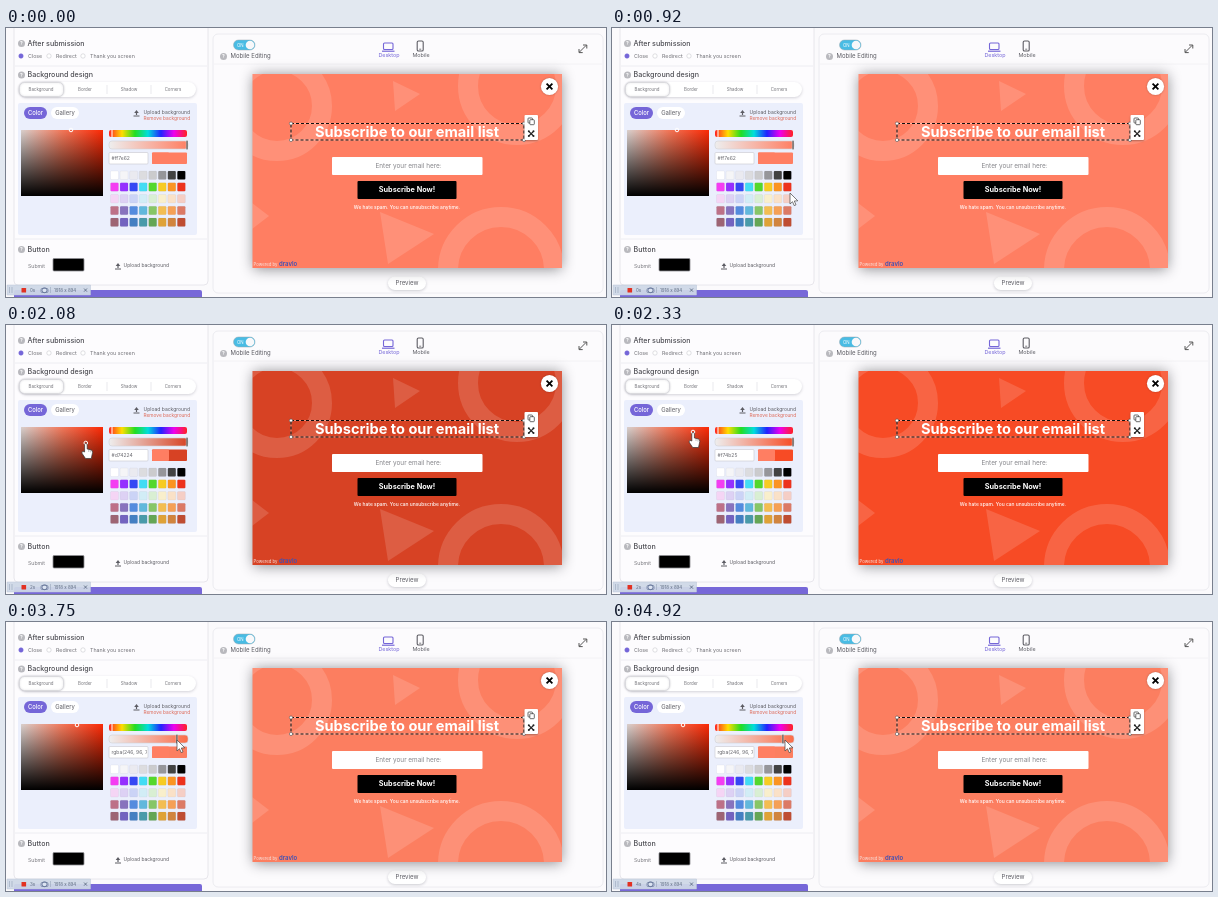
Recreate the animation shown at these times as an HTML page with a canvas. Size 600x269 px, loop 5080 ms.

```html
<!DOCTYPE html>
<html lang="en">
<head>
<meta charset="utf-8">
<title>Popup background editor</title>
<style>
  html, body { margin: 0; width: 100%; height: 100%; overflow: hidden; background: #fbfafc; }
  canvas { display: block; width: 600px; height: 269px; }
</style>
</head>
<body>
<canvas id="stage"></canvas>
<script>
const W = 600, H = 269, LOOP = 5080;
const canvas = document.getElementById('stage');
const ctx = canvas.getContext('2d');
const ratio = window.devicePixelRatio || 1;
canvas.width = W * ratio;
canvas.height = H * ratio;

const INK = '#5c5c63', PURPLE = '#7566d8', BASE = [255, 126, 98];
const TRANSLUCENT_LABEL = 'rgba(246, 96, 70, 0.87)';

// Each key: time, then values that are eased to the next key.
const COLOR_KEYS = [
  [0, ...BASE], [1330, ...BASE], [1580, 182, 68, 44], [1670, 168, 60, 37],
  [1830, 170, 58, 35], [2080, 215, 66, 36], [2330, 247, 75, 37],
  [2580, 250, 77, 41], [3000, 255, 108, 74], [3250, 251, 107, 72]
];
const MARKER_KEYS = [
  [0, 65, 102], [1330, 65, 102], [1580, 76, 121], [1670, 77, 125],
  [1920, 79, 125], [2330, 81, 107], [2580, 80, 106], [3000, 71, 103]
];
const CURSOR_KEYS = [
  [670, 206, 188], [920, 178, 165], [1000, 165, 152], [1330, 68, 104],
  [1580, 76, 121], [1670, 77, 125], [1920, 79, 125], [2330, 81, 107],
  [2580, 80, 106], [3000, 71, 103], [3080, 74, 104], [3250, 120, 112],
  [3420, 180, 117], [3670, 171, 118], [4000, 171, 118], [4420, 173, 118]
];
const ALPHA_KEYS = [[0, 1], [3420, 1], [3670, .87]];

function sample(keys, t) {
  if (t <= keys[0][0]) return keys[0].slice(1);
  const next = keys.findIndex(key => key[0] > t);
  if (next < 0) return keys[keys.length - 1].slice(1);
  const a = keys[next - 1], b = keys[next];
  const p = (t - a[0]) / (b[0] - a[0]);
  return a.slice(1).map((v, i) => v + (b[i + 1] - v) * p);
}

function heldTime(t) {
  const start = k => Math.round(Math.round(k * 1.56) * 100 / 12) * 10;
  let k = 38;
  while (k > 0 && start(k) > t) k--;
  return start(k);
}

const rgb = c => `rgb(${c.map(Math.round).join(',')})`;
const hex = c => '#' + c.map(v => Math.round(v).toString(16).padStart(2, '0')).join('');

function box(x, y, w, h, r, fill, stroke, line = .6) {
  ctx.beginPath();
  ctx.roundRect(x, y, w, h, r);
  paint(fill, stroke, line);
}

function disc(x, y, r, fill, stroke, line = .6) {
  ctx.beginPath();
  ctx.arc(x, y, r, 0, Math.PI * 2);
  paint(fill, stroke, line);
}

function poly(points, fill, stroke, line = .8, closed = true) {
  ctx.beginPath();
  points.forEach(([x, y]) => ctx.lineTo(x, y));
  if (closed) ctx.closePath();
  paint(fill, stroke, line);
}

function paint(fill, stroke, line) {
  if (fill) { ctx.fillStyle = fill; ctx.fill(); }
  if (stroke) { ctx.strokeStyle = stroke; ctx.lineWidth = line; ctx.stroke(); }
}

function line(x1, y1, x2, y2, color, width = .8) {
  poly([[x1, y1], [x2, y2]], null, color, width, false);
}

function text(str, x, y, size, color = INK, weight = 400, align = 'left') {
  ctx.font = `${weight} ${size}px Inter, sans-serif`;
  ctx.fillStyle = color;
  ctx.textAlign = align;
  ctx.textBaseline = 'middle';
  ctx.fillText(str, x, y);
}

function ramp(x1, y1, x2, y2, stops) {
  const g = ctx.createLinearGradient(x1, y1, x2, y2);
  stops.forEach((c, i) => g.addColorStop(i / (stops.length - 1), c));
  return g;
}

function shadowed(color, blur, offset, draw) {
  ctx.save();
  ctx.shadowColor = color;
  ctx.shadowBlur = blur * ratio;
  ctx.shadowOffsetY = offset * ratio;
  draw();
  ctx.restore();
}

function help(x, y) {
  disc(x, y, 3.5, '#b9b9be');
  text('?', x, y + .3, 5, '#fff', 700, 'center');
}

function uploadIcon(x, y) {
  line(x - 3, y + 3, x + 3, y + 3, INK, 1);
  line(x, y + 2, x, y - 1, INK, 1.2);
  poly([[x - 2.3, y], [x, y - 3], [x + 2.3, y]], INK);
}

function heading(str, y) {
  help(15.5, y);
  text(str, 21.5, y, 7.1, '#4a4a50', 500);
}

function drawOptions() {
  box(8, -8, 194, 265, 4, '#fdfcfe', '#e2e1e8', .8);
  heading('After submission', 15.5);
  [[15, 'Close'], [43, 'Redirect'], [77, 'Thank you screen']].forEach(([x, label], i) => {
    disc(x, 28, 2.2, i ? '#fff' : PURPLE, i ? '#c9c9cf' : PURPLE);
    text(label, x + 7, 28, 5.3, '#707076');
  });
  line(9, 38, 201, 38, '#e9e8ee');
  heading('Background design', 47);
  shadowed('rgba(60,60,80,.22)', 3, 1, () => box(13, 54, 177, 15, 7.5, '#fff'));
  shadowed('rgba(60,60,80,.3)', 2, 0, () => box(13.5, 54.5, 44, 14, 5, '#fff', '#d6d6da'));
  ['Background', 'Border', 'Shadow', 'Corners'].forEach((label, i) =>
    text(label, 35 + i * 44, 62, 4.4, '#707076', 400, 'center'));
  [101, 145].forEach(x => line(x, 57, x, 66, '#e4e4e9'));

  box(12, 75, 179, 132, 2, '#ebeffc');
  box(18, 79, 23, 12, 6, PURPLE);
  text('Color', 29.5, 85, 5.9, '#fff', 500, 'center');
  box(45, 79, 28, 12, 6, '#fff');
  text('Gallery', 59, 85, 5.9, INK, 400, 'center');
  uploadIcon(130.5, 85);
  text('Upload background', 137.5, 84, 5);
  text('Remove background', 137.5, 91, 4.8, '#de6755');

  line(9, 211, 201, 211, '#e9e8ee');
  heading('Button', 221.5);
  text('Submit', 22, 238, 5.2, '#77777d');
  box(47, 230.5, 31, 12.5, 1, '#000', '#8d8d92', .8);
  uploadIcon(112, 238);
  text('Upload background', 117.5, 238, 4.9);
  box(8, 262, 188, 10, 2, '#7768d8');
}

const SWATCHES = [
  'fff f5f5f7 eaeaf0 dcdcdf cbcbcd 96969a 424242 000',
  'f43df2 952fff 3547f4 42dcf4 54d82c f7cb23 fb9422 ed321c',
  'f5d5f5 ddd1f4 cbd3f6 d2edf6 d9efd3 f9efcc fae1c7 f5cec5',
  'bd7187 8873bd 548bde 61b8dc 87c667 f3bd52 f5a056 dc7a65',
  '9d6473 7363bf 447fc2 499aa9 65a655 dfa237 d1843e bf4d32'
].map(row => row.split(' '));

function drawPicker(color, alpha, marker, shade) {
  ctx.fillStyle = ramp(15, 0, 97, 0, ['#d9d0cd', '#f2785a', '#fb2a06']);
  ctx.fillRect(15, 102, 82, 66);
  ctx.fillStyle = ramp(0, 102, 0, 168, ['rgba(0,0,0,0)', '#000']);
  ctx.fillRect(15, 102, 82, 66);
  disc(marker[0], marker[1], 1.8, null, '#fff', 1);

  box(103, 102, 78, 7, 2, ramp(103, 0, 181, 0,
    ['#f22', '#fd0', '#2d2', '#0dd', '#22f', '#e0e', '#f22']));
  line(106, 101.5, 106, 109.5, '#fff', 1);
  box(103, 113, 79, 8, 3, ramp(103, 0, 182, 0, ['#eeeeee', rgb(color)]), '#d0d0d5');
  const handle = 103 + 78 * alpha;
  box(handle - .8, 112.5, 1.7, 9, .5, '#555', '#eee', .4);

  box(103, 124.5, 39, 11.5, 1, '#fff', '#c8c8ce');
  ctx.save();
  ctx.beginPath();
  ctx.rect(104, 125, 37, 11);
  ctx.clip();
  text(alpha < 1 ? TRANSLUCENT_LABEL : hex(color), 105.5, 130.5, 5, '#66666c');
  ctx.restore();
  box(146, 124.5, 35, 11.5, 1, shade);
  box(146, 124.5, 17, 11.5, 1, rgb(BASE));

  SWATCHES.forEach((row, j) => row.forEach((c, i) =>
    box(104.5 + i * 9.55, 143 + j * 11.75, 8, 8.5, 1, '#' + c, 'rgba(120,120,140,.18)', .4)));
}

function drawToolbar() {
  box(207, 6, 390, 259, 5, '#fcfbfd', '#e8e7ec', .8);
  line(208, 36, 596, 36, '#efeff3');
  box(227.5, 12, 21.5, 10, 5, '#49bce4', '#9ba7ae', .5);
  disc(244, 17, 4.3, '#f8f8fa');
  text('ON', 231, 17.2, 4.4, '#fff');
  help(217.5, 28.5);
  text('Mobile Editing', 224.5, 28.5, 6);

  box(377.5, 15, 9.5, 6.5, 1, null, PURPLE, 1.1);
  line(376, 23.2, 388.5, 23.2, PURPLE, 1.2);
  text('Desktop', 383, 27.5, 5.4, PURPLE, 400, 'center');
  box(411.2, 13, 6, 10, 1.3, null, INK, 1.1);
  line(413.2, 21.2, 415.2, 21.2, INK, .8);
  text('Mobile', 415, 27.5, 5.4, INK, 400, 'center');

  line(573.5, 24, 580, 17.5, '#444', .9);
  poly([[577, 17], [580.8, 17], [580.8, 20.5]], null, '#444', .9, false);
  poly([[573, 21], [573, 24.6], [576.7, 24.6]], null, '#444', .9, false);

  shadowed('rgba(60,60,80,.25)', 3, 1, () => box(382, 248.5, 38, 13.5, 6.75, '#fff'));
  text('Preview', 401, 255.3, 6.1, INK, 400, 'center');
}

function drawPopup(shade) {
  shadowed('rgba(40,40,50,.55)', 13, 1, () => box(246.5, 46, 309.5, 194, 0, shade));
  ctx.save();
  ctx.beginPath();
  ctx.rect(246.5, 46, 309.5, 194);
  ctx.clip();
  const tint = 'rgba(255,255,255,.14)';
  disc(271, 78, 45, null, tint, 20);
  disc(495, 242, 53, null, tint, 20);
  disc(511, 58, 49, null, tint, 20);
  poly([[387, 53], [414, 66], [389, 83]], tint);
  poly([[374, 184], [428, 206], [382, 236]], tint);
  poly([[246, 175], [263, 188], [246, 201]], tint);
  ctx.restore();

  box(285, 95.5, 233, 16.5, 0, null, 'rgba(255,255,255,.5)', .8);
  ctx.setLineDash([3, 2]);
  box(285, 95.5, 233, 16.5, 0, null, '#111', 1.1);
  ctx.setLineDash([]);
  [285, 518].forEach(x => [95.5, 112].forEach(y => disc(x, y, 1.6, '#fff', '#555', .6)));
  text('Subscribe to our email list', 401, 104.5, 14.6, '#fff', 700, 'center');

  shadowed('rgba(0,0,0,.3)', 2, 1, () => box(518.5, 87, 13.5, 25, 1, '#fff'));
  box(522, 90, 4.5, 5, .8, '#fff', '#444', .8);
  box(523.8, 91.7, 4.5, 5, .8, '#fff', '#444', .8);
  line(522.8, 103.3, 527.5, 108, '#222', 1.2);
  line(527.5, 103.3, 522.8, 108, '#222', 1.2);
  [522.8, 527.5].forEach(x => [103.3, 108].forEach(y => disc(x, y, 1, '#222')));

  shadowed('rgba(0,0,0,.3)', 2, 0, () => disc(543.5, 58.5, 8.6, '#fff'));
  line(540.6, 55.6, 546.4, 61.4, '#000', 1.8);
  line(546.4, 55.6, 540.6, 61.4, '#000', 1.8);

  box(326, 129, 150.5, 18, 1, '#fff');
  text('Enter your email here:', 402.5, 138.3, 6.4, '#85858a', 400, 'center');
  box(351.5, 153, 99, 18, 1, '#000');
  text('Subscribe Now!', 401, 162.2, 7.3, '#fff', 700, 'center');
  text('We hate spam. You can unsubscribe anytime.', 401, 180, 4.9, '#fff', 500, 'center');
  text('Powered by', 247.5, 237, 4.3, '#f6e8e5');
  text('dravlo', 273, 236.5, 6, '#3f51b5', 600);
}

function drawRecorder(t) {
  box(1, 257, 83.5, 10, 0, 'rgba(207,216,231,.94)', '#b9c4d6', .5);
  [3.5, 6].forEach(x => line(x, 259, x, 265, '#99a6ba', .6));
  box(15.5, 260, 4.6, 4.6, .5, '#e23122');
  text(`${Math.floor(t / 1000)}s`, 24, 262.2, 4.5, '#5e6b80');
  disc(38.5, 262.2, 2.5, '#dce4f2', '#5d6d93', .8);
  box(35, 260.5, 7, 4, 1, null, '#5d6d93', .6);
  line(44.5, 259, 44.5, 265, '#99a6ba', .6);
  text('1918 x 894', 48, 262.2, 4.4, '#5e6b80');
  line(78, 260.5, 81, 263.7, '#53627b');
  line(81, 260.5, 78, 263.7, '#53627b');
}

function drawCursor(t) {
  if (t < 670) return;
  const [x, y] = sample(CURSOR_KEYS, t);
  ctx.save();
  ctx.translate(x, y);
  ctx.lineJoin = 'round';
  if (t >= 1920 && t < 3250) {
    ctx.beginPath();
    ctx.moveTo(-1.2, 9);
    ctx.lineTo(-1.2, 1.4);
    ctx.quadraticCurveTo(0, -.8, 1.4, 1.4);
    ctx.lineTo(1.4, 6);
    ctx.lineTo(5.3, 7);
    ctx.quadraticCurveTo(7, 7.4, 6.8, 9.5);
    ctx.lineTo(5.5, 15.5);
    ctx.lineTo(-.3, 15.5);
    ctx.lineTo(-4, 10);
    ctx.quadraticCurveTo(-3.6, 7.2, -1.2, 9);
    ctx.closePath();
    paint('#fff', '#333', .7);
    line(3, 7, 3, 9, '#777', .5);
    line(5, 7.5, 5, 9.5, '#777', .5);
  } else {
    poly([[0, 0], [0, 11], [2.5, 8.7], [4.2, 12.6], [6, 11.8], [4.3, 8], [7.8, 7.8]],
      '#fff', '#444', .7);
  }
  ctx.restore();
}

function draw(now) {
  const t = heldTime(now % LOOP);
  const color = sample(COLOR_KEYS, t);
  const [alpha] = sample(ALPHA_KEYS, t);
  const shade = rgb(color.map(v => v * alpha + 255 * (1 - alpha)));
  ctx.setTransform(ratio, 0, 0, ratio, 0, 0);
  ctx.fillStyle = '#fbfafc';
  ctx.fillRect(0, 0, W, H);
  drawOptions();
  drawPicker(color, alpha, sample(MARKER_KEYS, t), shade);
  drawToolbar();
  drawPopup(shade);
  drawRecorder(t);
  drawCursor(t);
}

const began = performance.now();
function tick() {
  draw(performance.now() - began);
  requestAnimationFrame(tick);
}
tick();
</script>
</body>
</html>
```
